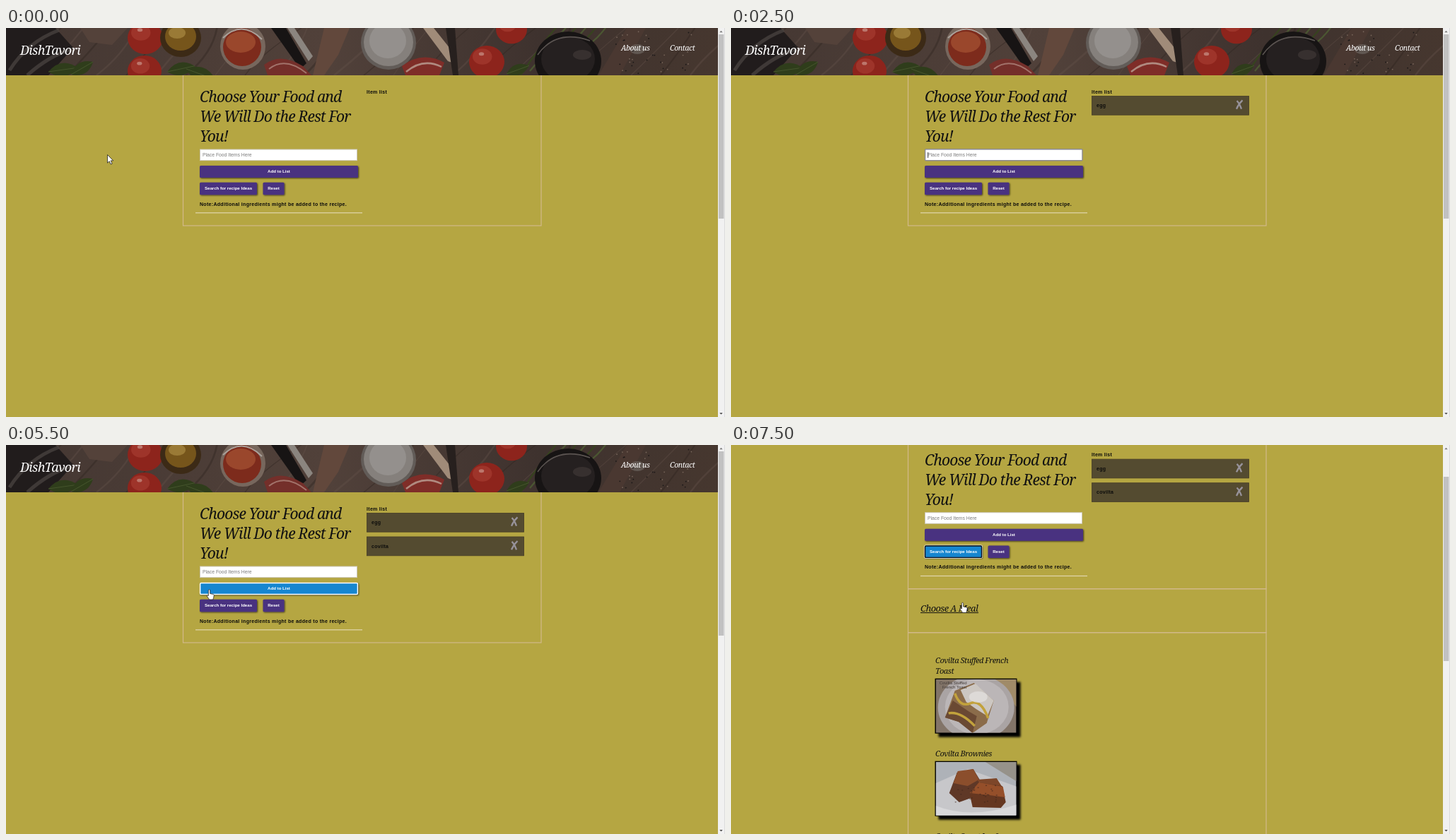
Write an HTML page that moves like this. It is 1017 by 551 pixels and loops after 8000 ms.

```html
<!DOCTYPE html>
<html lang="en">
<head>
<meta charset="utf-8">
<title>Recipe finder</title>
<style>
html, body { margin: 0; width: 100%; height: 100%; overflow: hidden; background: #b5a642; }
svg { display: block; }
text { font-family: "Liberation Sans", Arial, sans-serif; white-space: pre; }
.script { font-family: "Noto Serif", serif; font-style: italic; letter-spacing: -.04em; fill: #111; }
.bold { font-weight: 700; font-size: 7px; letter-spacing: .3px; fill: #0b0b0b; }
.label { font-weight: 700; font-size: 6.1px; fill: #fff; }
.field { font-size: 6.8px; }
.frame { fill: none; stroke: #d2b98a; stroke-width: 1.2; }
.light { fill: #fff; font-weight: 500; }
</style>
</head>
<body>
<svg id="stage" width="1017" height="551" viewBox="0 0 1017 551" xmlns="http://www.w3.org/2000/svg"></svg>
<script>
const STEP = 500, LOOP = 8000, SCROLL = 76.3;
const BRAND = 'DishTavori', SPREAD = 'covilta', SPREAD_TITLE = 'Covilta';
const PURPLE = '#483080', BLUE = '#1886d0';

let seed = 7;
const rand = () => (seed = seed * 16807 % 2147483647) / 2147483647;
const repeat = (n, fn) => Array.from({ length: n }, (_, i) => fn(i)).join('');

const text = (x, y, s, cls, attrs = '') => `<text x="${x}" y="${y}" class="${cls}" ${attrs}>${s}</text>`;
const script = (x, y, size, s, cls = '') => text(x, y, s, 'script ' + cls, `font-size="${size}"`);
const rect = (x, y, w, h, fill, attrs = '') => `<rect x="${x}" y="${y}" width="${w}" height="${h}" fill="${fill}" ${attrs}/>`;
const oval = (x, y, rx, ry, fill, attrs = '') => `<ellipse cx="${x}" cy="${y}" rx="${rx}" ry="${ry}" fill="${fill}" ${attrs}/>`;
const shape = (d, fill, attrs = '') => `<path d="${d}" fill="${fill}" ${attrs}/>`;
const stroke = (d, color, w, attrs = '') => `<path d="${d}" fill="none" stroke="${color}" stroke-width="${w}" ${attrs}/>`;

const tomato = (x, y, r) => oval(x, y, r, r * .92, '#8d241c') +
  oval(x - r * .25, y - r * .3, r * .55, r * .45, '#aa4034', 'opacity=".6"') +
  oval(x - r * .3, y - r * .45, r * .15, r * .1, '#d0a49a', 'opacity=".6"');

const leaf = (x, y, w, turn) => `<g transform="translate(${x} ${y}) rotate(${turn})">` +
  shape(`M0 0Q${w / 2} ${-w * .45} ${w} 0Q${w / 2} ${w * .45} 0 0`, '#2f3d1b') +
  stroke(`M0 0H${w}`, '#4a5930', .8) + '</g>';

const header = () => `<svg width="1007" height="67">
  ${rect(0, 0, 1007, 67, 'url(#wood)')}
  ${repeat(26, i => stroke(`M${i * 42 - 40} 67q${20 + rand() * 20} -30 ${40 + rand() * 40} -67`, i % 2 ? '#2e2420' : '#63504a', 1 + rand() * 2, 'opacity=".4"'))}
  ${shape('M0 0H70L95 28 60 67H0z', '#211c1c')}
  ${stroke('M5 60Q30 20 75 3M30 67Q60 40 92 30', '#4c4744', 5, 'opacity=".7"')}
  ${shape('M105 0H172L150 24 118 20z', '#54423a')}
  ${leaf(60, 62, 42, -8)}${leaf(92, 66, 36, -30)}
  ${tomato(197, 14, 25)}${tomato(196, 61, 24)}
  ${oval(247, 14, 29, 27, '#3c2a16')}${oval(247, 12, 22, 20, '#76551b')}${oval(242, 7, 12, 8, '#9a7a36')}
  ${leaf(228, 62, 40, -12)}${leaf(255, 58, 44, 20)}
  ${oval(335, 26, 32, 33, '#77675d')}${oval(334, 27, 27, 27, '#7d2b1c')}${oval(332, 20, 21, 15, '#9a472c')}
  ${stroke('M307 14Q334 -12 362 16', '#aaa19a', 2)}
  ${shape('M375 0H396L425 50 416 58z', '#171414')}${shape('M398 0H408L434 40 428 47z', '#8b857f')}
  ${shape('M365 52Q388 34 420 54L432 67H370z', '#742f2a')}${stroke('M372 58Q395 40 425 64', '#a2736b', 2)}
  ${shape('M450 0H486L470 38 450 67H434z', '#62483c')}
  ${oval(541, 21, 39, 38, '#625c58')}${oval(541, 20, 35, 34, '#85807c')}${oval(540, 18, 26, 25, '#94908d')}
  ${shape('M560 54Q588 32 620 49L613 67H565z', '#7f2d28')}${stroke('M566 62Q590 42 616 55', '#b08a80', 2.5)}
  ${shape('M590 0H605L636 39 634 50 625 47z', '#a08b79')}${shape('M622 0H635L640 67H632z', '#27201e')}
  ${tomato(680, 48, 25)}${tomato(715, 2, 22)}
  ${repeat(6, i => stroke(`M${728 + i * 13} ${67 - i * 6}Q${752 + i * 15} 30 ${780 + i * 14} -3`, i % 2 ? '#4b5732' : '#37431f', 2.2))}
  ${leaf(708, 65, 34, -20)}
  ${oval(795, 47, 47, 42, '#171414')}${oval(795, 44, 38, 32, '#252020')}
  ${stroke('M752 38Q778 1 826 18', '#5b5451', 1.6)}${oval(815, 38, 13, 7, '#443c3a', 'opacity=".6"')}
  ${shape('M838 67L878 0H905L868 67z', '#4a3831')}
  ${oval(893, 30, 11, 7, '#85807c', 'opacity=".45"')}
  ${repeat(40, () => oval(860 + rand() * 110, 5 + rand() * 60, .9, .9, rand() > .5 ? '#1c1818' : '#77655a'))}
  ${script(20, 38, 18, BRAND, 'light')}
  ${script(870, 32, 10.6, 'About us', 'light')}
  ${script(939, 32, 10.6, 'Contact', 'light')}
</svg>`;

const button = (x, y, w, h, label, { fill = PURPLE, ring = '' } = {}) =>
  rect(x, y, w, h, fill, 'rx="1.5" filter="url(#drop)"') +
  (ring === 'white' ? rect(x + .6, y + .6, w - 1.2, h - 1.2, 'none', 'rx="1.5" stroke="#fff" stroke-width="1.5"') : '') +
  (ring === 'dark' ? rect(x - .6, y - .6, w + 1.2, h + 1.2, 'none', 'rx="2" stroke="#eee" stroke-width=".8"') +
    rect(x + .5, y + .5, w - 1, h - 1, 'none', 'rx="1.5" stroke="#10131c" stroke-width="1.4"') : '') +
  text(x + w / 2, y + 10.4, label, 'label', 'text-anchor="middle"');

const field = ({ typed = '', focus, checked }) => {
  const width = typed ? measure(typed) : 0;
  return (focus
    ? rect(274.6, 171.7, 222.4, 16, '#fff', 'rx="1" stroke="#8b8990" stroke-width="1.4"')
    : rect(274.5, 172, 222, 15.6, '#fff', `stroke="${typed ? '#807b6a' : '#ccc8b8'}"`)) +
    text(278, 182.4, typed || 'Place Food Items Here', 'field', `fill="${typed && focus ? '#4a4a4a' : '#7b7b7b'}"`) +
    (focus ? rect(278.3 + width, 176, .8, 8, '#222') : '') +
    (checked ? stroke(`M278 184h${width}`, '#a66', .7) : '');
};

const item = (name, i) => {
  const y = 96.4 + i * 33.6;
  return rect(510.4, y, 222.2, 26.8, '#544b30', 'stroke="#463e27" stroke-width=".8"') +
    text(517, y + 15.6, name, 'bold') +
    stroke(`M715 ${y + 18.3}Q718 ${y + 11} 723.5 ${y + 6}M715.5 ${y + 6.8}Q719 ${y + 10} 722 ${y + 18.3}`, '#97929a', 2.3);
};

const form = s => rect(250.5, 60, 506.5, 220, 'none', 'class="frame"') +
  ['Choose Your Food and', 'We Will Do the Rest For', 'You!'].map((l, i) => script(274, 105 + i * 28, 21, l)).join('') +
  field(s) +
  button(274, 195, 224, 17, 'Add to List', s.add) +
  button(274, 218.8, 81, 17.4, 'Search for recipe Ideas', s.search) +
  button(363.5, 218.8, 30, 17.4, 'Reset') +
  text(274, 251.5, 'Note:Additional ingredients might be added to the recipe.', 'bold') +
  rect(268, 261.2, 236, 1.2, '#e0d6ac') +
  text(510, 92.6, 'Item list', 'bold') +
  (s.items || []).map(item).join('');

const toast = () => rect(0, 0, 115, 77, '#827468') +
  shape('M80 0H115V40z', '#a08b68') +
  oval(57, 40, 54, 46, '#aaa4a4') + oval(58, 39, 45, 39, '#bbb6b7') +
  shape('M13 54L27 16 54 5 82 30 72 62 52 76 38 62z', '#8b6c4a') +
  shape('M13 54L24 30 46 45 58 52 52 76 32 60z', '#6a4933') +
  shape('M35 15L56 6 82 30 73 52 57 42 43 32z', '#ccc7c2') +
  stroke('M27 20Q34 40 49 34T74 55M18 48Q35 45 55 66', '#c2a23c', 3.5) +
  oval(60, 25, 13, 8, '#e2dfdd', 'opacity=".8"') +
  text(5, 7, SPREAD_TITLE + ' Stuffed', '', 'font-size="6" fill="#443c39"') +
  text(9, 13, 'French Toast', '', 'font-size="6" fill="#443c39"');

const brownies = () => rect(0, 0, 115, 77, '#aeb2b8') +
  shape('M0 30L45 10 115 35V77H0z', '#c7c7ca') + shape('M55 0H70L115 28V0z', '#96928a') +
  shape('M0 62Q50 82 115 60V77H0z', '#d8d8da') +
  shape('M19 44L30 15 53 10 62 25 58 48 33 57z', '#5f3827') +
  shape('M25 30L31 13 53 10 61 25 45 34z', '#8b4e2c') +
  shape('M58 25L86 23 93 34 70 38z', '#7d4629') +
  shape('M48 46L60 29 94 34 99 57 92 65 52 64z', '#653721') +
  shape('M48 44L61 29 95 35 98 50 76 47z', '#954f2a') +
  repeat(30, () => oval(28 + rand() * 62, 32 + rand() * 27, 1.2, .8, '#3e251d', 'opacity=".6"'));

const picture = (y, art) => rect(288.5, y, 116, 78, '#000', 'filter="url(#deep)"') +
  `<svg x="289.7" y="${y + 1.2}" width="113.6" height="75.6">${art}</svg>`;

const meals = full => rect(250.5, 280, 506.5, 62, 'none', 'class="frame"') +
  script(268, 312, 12.8, 'Choose A Meal') + rect(268, 313.4, 82, 1, '#111') +
  rect(250.5, 342, 506.5, full ? 900 : 64, 'none', 'class="frame"') +
  (full ? script(289, 385, 11, SPREAD_TITLE + ' Stuffed French') + script(289, 400, 11, 'Toast') +
    picture(407, pics.toast) +
    script(289, 517, 11, SPREAD_TITLE + ' Brownies') + picture(524, pics.brownies) +
    script(289, 634, 11, SPREAD_TITLE + ' Sweet Loaf') : '');

const pointers = {
  arrow: 'M0 0V11.6L2.7 9.2 4.7 13.6 6.6 12.7 4.7 8.4H8.2z',
  hand: 'M-1.2 1c0-1.6 2.4-1.6 2.4 0v4.5l4 .8c1.2.3 1.6 1 1.5 2l-.6 3.2c-.2.8-.6 1.2-.8 2.5h-5.3c-.6-1.5-2.8-4-3.2-5-.3-1 .8-1.6 1.6-.8l.4.4z'
};
const pointer = ([kind, x, y]) => `<g transform="translate(${x} ${y})">` +
  shape(pointers[kind], '#fff', 'stroke="#222" stroke-width=".8" stroke-linejoin="round"') + '</g>';

const scrollbar = y => rect(1007, 0, 10, 551, '#f1f1f1') +
  rect(1008, 9 + y * .472, 7.4, 261, '#c1c1c1') +
  shape('M1009.3 6.2l2.2-2.4 2.2 2.4z', '#777') + shape('M1009.3 545l2.2 2.4 2.2-2.4z', '#505050') +
  rect(1016, 0, 1, 551, '#dcdcdc');

const hover = { fill: BLUE };
const pressed = { fill: BLUE, ring: 'white' };
const searched = { fill: BLUE, ring: 'dark' };
const one = ['egg'], two = ['egg', SPREAD];

// One entry per half second of the screen recording.
const scenes = [
  { at: ['arrow', 143.5, 179.5] },
  { at: ['arrow', 250, 181] },
  { focus: true, typed: 'e' },
  { focus: true, typed: 'egg' },
  { typed: 'egg', add: pressed, at: ['hand', 332, 201] },
  { items: one, focus: true },
  { items: one, focus: true },
  { items: one, focus: true, typed: SPREAD.slice(0, 4) },
  { items: one, focus: true, typed: SPREAD },
  { items: one, focus: true, typed: SPREAD, checked: true },
  { items: one, focus: true, typed: SPREAD, checked: true, add: { fill: '#2072bd' }, at: ['hand', 286.8, 204.5] },
  { items: two, add: pressed, at: ['hand', 287.5, 205] },
  { items: two, search: hover, at: ['hand', 292, 228] },
  { items: two, search: searched, meals: 1, at: ['hand', 293.3, 229] },
  { items: two, search: searched, meals: 2, at: ['hand', 326.3, 225] },
  { items: two, search: searched, meals: 2, scroll: SCROLL, at: ['hand', 327.5, 223.5] }
];

const pen = document.createElement('canvas').getContext('2d');
pen.font = '6.8px "Liberation Sans", Arial, sans-serif';
const measure = s => pen.measureText(s).width;

const pics = { toast: toast(), brownies: brownies() };
const top67 = header();
const shadow = (id, d, blur, alpha) => `<filter id="${id}" x="-20%" y="-30%" width="150%" height="180%">
  <feDropShadow dx="${d}" dy="${d}" stdDeviation="${blur}" flood-color="#000" flood-opacity="${alpha}"/></filter>`;

const stage = document.getElementById('stage');
stage.innerHTML = `<defs>${shadow('drop', 1, .8, .65)}${shadow('deep', 5, 1.8, 1)}
  <linearGradient id="wood"><stop stop-color="#443732"/><stop offset=".45" stop-color="#51413a"/>
  <stop offset=".75" stop-color="#3e322e"/><stop offset="1" stop-color="#46372f"/></linearGradient></defs>
  ${rect(0, 0, 1017, 551, '#b5a642')}<g id="view"></g>`;
const view = document.getElementById('view');

let shown = -1;
function draw(ms) {
  const i = Math.floor(ms % LOOP / STEP);
  if (i === shown) return;
  shown = i;
  const s = scenes[i], y = s.scroll || 0;
  view.innerHTML = `<g transform="translate(0 ${-y})">${form(s)}${s.meals ? meals(s.meals > 1) : ''}${top67}</g>` +
    scrollbar(y) + (s.at ? pointer(s.at) : '');
}

const start = performance.now();
function tick() {
  draw(performance.now() - start);
  requestAnimationFrame(tick);
}
tick();
</script>
</body>
</html>
```
